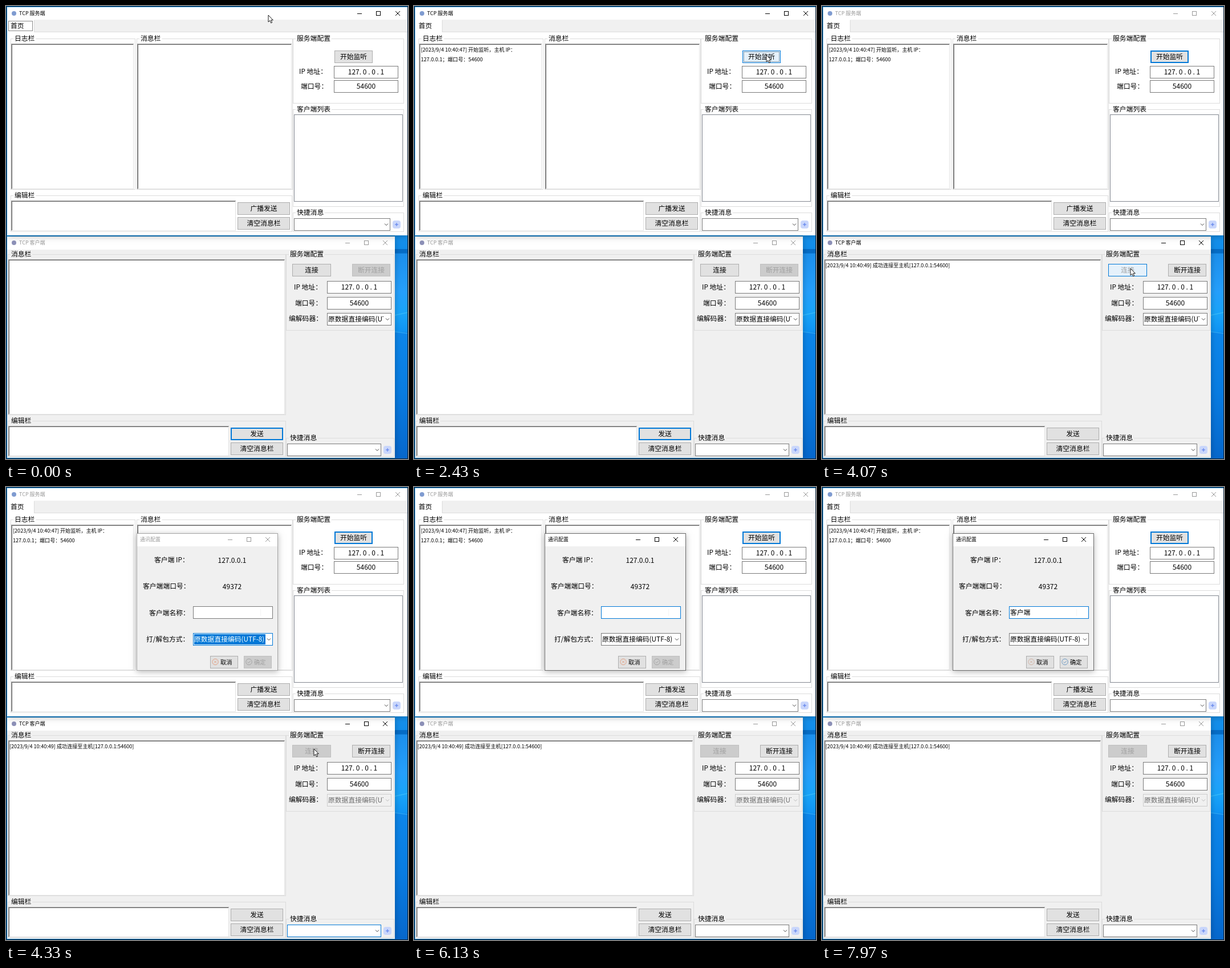
Animation, 705 px wide and 794 px high, one loop 8 s. Source, as an HTML page with a canvas:

```html
<!DOCTYPE html>
<html lang="zh-CN">
<head>
<meta charset="utf-8">
<style>
html, body { margin: 0; width: 100%; height: 100%; overflow: hidden; background: #0a84d8; }
canvas { display: block; }
</style>
</head>
<body>
<canvas id="stage" width="705" height="794"></canvas>
<script>
const c = document.getElementById('stage').getContext('2d');
const LOOP = 8000, BLUE = '#0078d7', FACE = '#f0f0f0', SIZE = 11.8;

// Moments at which the interface changes, in ms
const LISTEN = 2000, CONNECT = 3900, LOCKED = 4180, DIALOG = 4300, FOCUS_NAME = 5450, NAMED = 7300;

// Pointer tip: time, x, y
const PATH = [
  [0, 460, 16], [870, 460, 16], [1430, 587, 78], [1700, 618, 86], [2600, 618, 86],
  [3400, 541, 460], [4300, 541, 460], [5000, 446, 218], [8000, 446, 218]
];

function pointerAt(t) {
  const i = Math.max(1, PATH.findIndex(p => p[0] > t));
  const [t0, x0, y0] = PATH[i - 1], [t1, x1, y1] = PATH[i];
  const u = (t - t0) / (t1 - t0), e = u * u * (3 - 2 * u);
  return { x: Math.round(x0 + (x1 - x0) * e), y: Math.round(y0 + (y1 - y0) * e) };
}

const inside = (p, x, y, w, h) => p.x >= x && p.x < x + w && p.y > y && p.y < y + h;

function fill(x, y, w, h, color) {
  c.fillStyle = color;
  c.fillRect(x, y, w, h);
}

function frame(x, y, w, h, color, line = 1) {
  c.strokeStyle = color;
  c.lineWidth = line;
  c.strokeRect(x + line / 2, y + line / 2, w - line, h - line);
}

function box(x, y, w, h, back, border, line) {
  fill(x, y, w, h, back);
  frame(x, y, w, h, border, line);
}

function line(points, color, width = 1) {
  c.strokeStyle = color;
  c.lineWidth = width;
  c.beginPath();
  points.forEach(([x, y]) => c.lineTo(x, y));
  c.stroke();
}

// y is the optical middle of the line
function text(s, x, y, { size = SIZE, color = '#000', align = 'left' } = {}) {
  c.font = `${size}px "Noto Sans CJK SC", "Noto Sans CJK", sans-serif`;
  c.textAlign = align;
  c.fillStyle = color;
  c.fillText(s, x, y + size * 0.38);
}

function disc(x, y, r, color) {
  c.fillStyle = color;
  c.beginPath();
  c.arc(x, y, r, 0, 7);
  c.fill();
}

function group(label, x, y, w, h, back, labelX = x + 7) {
  frame(x, y, w, h, '#dcdcdc');
  fill(labelX - 2, y - 2, label.length * SIZE + 4, 5, back);
  text(label, labelX, y);
}

function sunken(x, y, w, h) {
  fill(x, y, w, h, '#fff');
  frame(x, y, w, h, '#e3e3e3');
  fill(x, y, w, 1, '#a0a0a0');
  fill(x, y, 1, h, '#a0a0a0');
  fill(x + 1, y + 1, w - 2, 1, '#696969');
  fill(x + 1, y + 1, 1, h - 2, '#696969');
}

function button(label, x, y, w, { hover, focus, disabled, h = 22 } = {}) {
  if (hover) box(x, y, w, h, '#e5f1fb', BLUE);
  else if (disabled) box(x, y, w, h, '#ccc', '#bfbfbf');
  else box(x, y, w, h, '#e1e1e1', focus ? BLUE : '#adadad', focus ? 2 : 1);
  if (hover && focus) frame(x + 2, y + 2, w - 4, h - 4, '#8ba3b5');
  text(label, x + w / 2, y + h / 2, { color: disabled ? '#a0a0a0' : '#000', align: 'center' });
}

function field(value, x, y, w = 113, h = 22) {
  box(x, y, w, h, '#fff', '#7a7a7a');
  text(value, x + w / 2, y + h / 2 - 0.5, { size: 12, align: 'center' });
}

function combo(value, x, y, w, { focus, disabled, selected, h = 22 } = {}) {
  box(x, y, w, h, disabled ? FACE : '#fff', focus ? BLUE : disabled ? '#ccc' : '#7a7a7a');
  if (selected) fill(x + 2, y + 2, w - 15, h - 4, BLUE);
  c.save();
  c.beginPath();
  c.rect(x, y, w - 14, h);
  c.clip();
  text(value, x + 2, y + h / 2 - 0.5, { color: selected ? '#fff' : disabled ? '#6d6d6d' : '#000' });
  c.restore();
  const ax = x + w - 7, ay = y + h / 2;
  line([[ax - 3, ay - 1.5], [ax, ay + 1.5], [ax + 3, ay - 1.5]], disabled ? '#bbb' : '#444');
}

function plus(x, y) {
  c.fillStyle = '#c9d6fb';
  c.beginPath();
  c.roundRect(x - 7, y - 7, 14, 14, 4);
  c.fill();
  fill(x - 3, y - 0.5, 6, 1, '#4f74ea');
  fill(x - 0.5, y - 3, 1, 6, '#4f74ea');
}

function titleBar(title, x, y, w, titleX, controls, active) {
  const color = active ? '#000' : '#999', cy = y + 11;
  fill(x, y, w, 23, '#fff');
  text(title, titleX, cy, { size: 9, color });
  const [min, max, close] = controls;
  fill(min - 4, cy, 8, 1, color);
  frame(max - 4, cy - 4, 8, 8, color);
  line([[close - 4, cy - 4], [close + 4, cy + 4]], color);
  line([[close - 4, cy + 4], [close + 4, cy - 4]], color);
}

function shadowed(x, y, w, h, color) {
  c.save();
  c.shadowColor = 'rgba(0,0,0,.28)';
  c.shadowBlur = 10;
  c.shadowOffsetY = 2;
  fill(x, y, w, h, color);
  c.restore();
}

function desktop() {
  fill(0, 0, 705, 794, '#0a84d8');
  const sky = c.createLinearGradient(0, 402, 0, 794);
  [[0, '#1592ee'], [0.06, '#118dea'], [0.061, '#056cc6'], [0.08, '#056cc6'], [0.081, '#1b8fec'],
   [0.25, '#259ffc'], [0.35, '#18a4fa'], [0.43, '#0f94f4'], [0.435, '#0c86ea'],
   [0.7, '#087ce2'], [1, '#0667cc']].forEach(([p, color]) => sky.addColorStop(p, color));
  fill(682, 402, 23, 392, sky);
  line([[682, 542], [705, 537]], '#35b8fb', 1.5);
  line([[682, 571], [705, 574]], '#2aa5f5', 1.5);
}

function server(t, p) {
  const listening = t >= LISTEN;
  shadowed(2, 2, 702, 400, '#fff');
  titleBar('TCP 服务端', 2, 2, 702, 23, [620, 653, 687], t < CONNECT);
  disc(14, 13, 4, '#7f9bd0');
  fill(2, 24, 702, 21, FACE);
  fill(2, 24, 47, 22, '#fff');
  fill(49, 45, 655, 1, '#dcdcdc');
  fill(49, 25, 1, 20, '#dcdcdc');
  if (!listening) frame(4, 26, 43, 18, '#8a8a8a');
  text('首页', 8, 35);

  group('日志栏', 8, 57, 219, 265, '#fff');
  sunken(9, 66, 215, 255);
  group('消息栏', 229, 57, 274, 265, '#fff');
  sunken(230, 66, 271, 255);
  if (listening) {
    text('[2023/9/4 10:40:47] 开始监听，主机 IP：', 12, 77, { size: 9.1 });
    text('127.0.0.1；端口号：54600', 12, 94, { size: 9.1 });
  }
  group('服务端配置', 503, 57, 195, 114, '#fff', 510);
  button('开始监听', 576, 78, 67, { hover: inside(p, 576, 78, 67, 22), focus: listening });
  text('IP 地址：', 514, 115);
  field('127. 0 . 0 . 1', 575, 105);
  text('端口号：', 517, 141);
  field('54600', 575, 130);
  group('客户端列表', 503, 181, 195, 171, '#fff', 510);
  box(505, 190, 191, 153, '#fff', '#828790');
  group('编辑栏', 8, 332, 494, 64, '#fff');
  sunken(9, 341, 394, 53);
  button('广播发送', 406, 344, 92);
  button('清空消息栏', 406, 370, 92);
  group('快捷消息', 503, 362, 195, 34, '#fff', 510);
  combo('', 505, 372, 169);
  plus(685, 383);
}

function client(t, p) {
  const connected = t >= CONNECT, locked = t >= LOCKED;
  shadowed(2, 404, 680, 388, FACE);
  titleBar('TCP 客户端', 2, 404, 680, 23, [599, 632, 665], connected && t < FOCUS_NAME);
  disc(14, 415, 4, '#8d91b8');

  group('消息栏', 3, 435, 488, 282, FACE, 9);
  sunken(4, 444, 485, 272);
  if (connected) text('[2023/9/4 10:40:49] 成功连接至主机[127.0.0.1:54600]', 6, 455, { size: 9.1 });
  group('编辑栏', 3, 727, 488, 63, FACE, 9);
  sunken(4, 736, 387, 53);
  button('发送', 394, 739, 92, { focus: !connected });
  button('清空消息栏', 394, 765, 92);
  group('服务端配置', 491, 435, 190, 134, FACE, 498);
  const hover = !locked && inside(p, 502, 452, 68, 22);
  button('连接', 502, 452, 68, { hover, disabled: connected });
  button('断开连接', 607, 452, 67, { disabled: !connected });
  text('IP 地址：', 505, 493);
  field('127. 0 . 0 . 1', 563, 482);
  text('端口号：', 507, 521);
  field('54600', 563, 510);
  text('编解码器：', 496, 548);
  combo('原数据直接编码(UTF-8)', 563, 538, 113, { disabled: locked });
  group('快捷消息', 491, 757, 190, 33, FACE, 498);
  combo('', 493, 767, 165, { focus: locked && t < FOCUS_NAME });
  plus(669, 778);
}

function iconButton(label, x, iconColor, mark, disabled) {
  button('', x, 296, 49, { disabled });
  c.strokeStyle = iconColor;
  c.lineWidth = 1;
  c.beginPath();
  c.arc(x + 9, 306.5, 5.2, 0, 7);
  c.stroke();
  mark.forEach(points => line(points.map(([dx, dy]) => [x + 9 + dx, 306.5 + dy]), iconColor));
  text(label, x + 18, 307, { size: 10.3, color: disabled ? '#a0a0a0' : '#000' });
}

function dialog(t) {
  const active = t >= FOCUS_NAME, named = t >= NAMED;
  shadowed(229, 81, 248, 241, FACE);
  titleBar('通讯配置', 230, 81, 246, 235, [393, 426, 459], active);
  frame(229, 81, 248, 241, active ? '#6b6b6b' : '#a5a5a5');
  text('客户端 IP：', 260, 128);
  text('127.0.0.1', 396.5, 128, { size: 12, align: 'center' });
  text('客户端端口号：', 240, 174);
  text('49372', 396.5, 174, { size: 12, align: 'center' });
  text('客户端名称：', 251, 221);
  box(328, 209, 140, 22, '#fff', active ? BLUE : '#7a7a7a');
  fill(446, 214, 1, 12, '#f4f4f4');
  if (named) text('客户端', 330, 220);
  const caretOn = Math.floor((t - (named ? NAMED : FOCUS_NAME)) / 530) % 2 === 0;
  if (active && caretOn) fill(named ? 366 : 331, 213, 1, 14, '#000');
  text('打/解包方式：', 246, 267);
  combo('原数据直接编码(UTF-8)', 328, 256, 140, { focus: !active, selected: !active });
  iconButton('取消', 358, named ? '#d3b3a4' : '#e3a184', [[[-2, -2], [2, 2]], [[-2, 2], [2, -2]]]);
  iconButton('确定', 417, named ? '#6f9bc4' : '#a5a5a5', [[[-2.5, 0], [-0.5, 2], [2.5, -1.5]]], !named);
}

function pointer({ x, y }) {
  c.beginPath();
  [[0, 0], [0, 12], [2.8, 9.4], [4.7, 13.8], [6.7, 12.9], [4.8, 8.7], [8.3, 8.7]]
    .forEach(([dx, dy]) => c.lineTo(x + dx, y + dy));
  c.closePath();
  c.fillStyle = '#fff';
  c.fill();
  c.strokeStyle = '#000';
  c.lineWidth = 0.9;
  c.stroke();
}

function draw(now) {
  const t = now % LOOP, p = pointerAt(t);
  desktop();
  client(t, p);
  server(t, p);
  if (t >= DIALOG) dialog(t);
  if (!(t >= DIALOG && inside(p, 328, 209, 140, 22))) pointer(p);
  frame(0, 0, 705, 794, '#06203a');
  requestAnimationFrame(draw);
}
requestAnimationFrame(draw);
</script>
</body>
</html>
```
